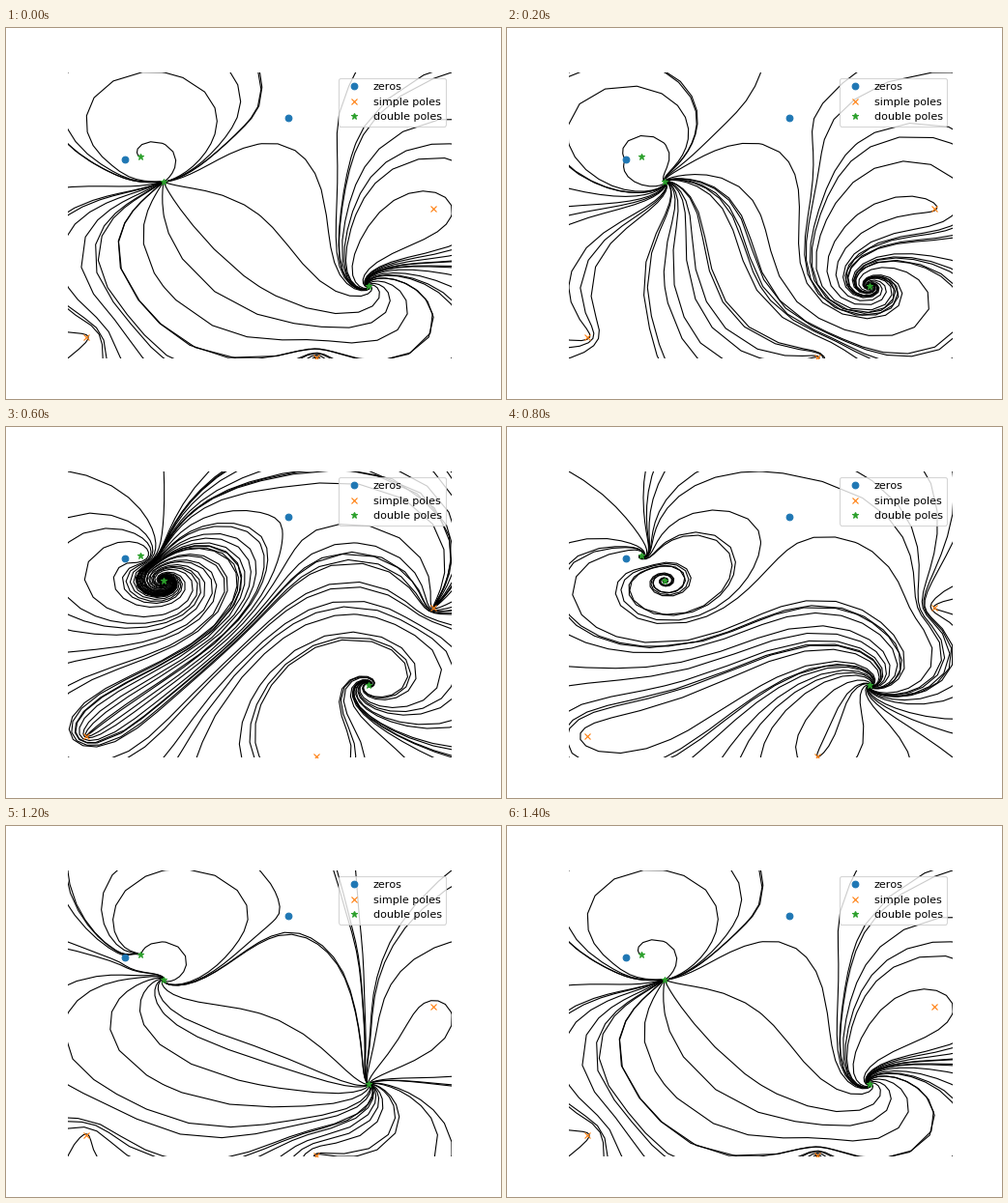
These frames come from a looping animation (512 px wide and 384 px high, 1.6 s). A matplotlib script:

```python
import math
from functools import lru_cache
import matplotlib.pyplot as plt
import numpy as np
from matplotlib.animation import FuncAnimation
from matplotlib.collections import LineCollection

ZEROS = [0.149 + 0.68j, -0.703 + 0.39j]
SIMPLE_POLES = [0.907 + 0.05j, -0.903 - 0.85j, 0.297 - 0.995j]
DOUBLE_POLES = [-0.62 + 0.41j, -0.5 + 0.235j, 0.57 - 0.497j]
FRAMES, INTERVAL = 8, 200
RTOL, ATOL = 1e-5, 1e-6
POLE_RADIUS, FAR, MAX_STEPS = 0.01, 30, 1000

# Dormand-Prince coefficients
STAGES = [
    (1 / 5,),
    (3 / 40, 9 / 40),
    (44 / 45, -56 / 15, 32 / 9),
    (19372 / 6561, -25360 / 2187, 64448 / 6561, -212 / 729),
    (9017 / 3168, -355 / 33, 46732 / 5247, 49 / 176, -5103 / 18656),
    (35 / 384, 0, 500 / 1113, 125 / 192, -2187 / 6784, 11 / 84),
]
ERROR = (-71 / 57600, 0, 71 / 16695, -71 / 1920, 17253 / 339200, -22 / 525, 1 / 40)


def velocity(z, turn, ref):
    """Natural flow 1/sqrt(q) at z, on the same side as ref."""
    q = turn
    for p in ZEROS:
        q *= z - p
    for p in SIMPLE_POLES:
        q /= z - p
    for p in DOUBLE_POLES:
        q /= (z - p) ** 2
    v = 1 / q ** 0.5
    return v if (v * ref.conjugate()).real >= 0 else -v


def scaled_norm(v, a, b):
    sx = ATOL + RTOL * max(abs(a.real), abs(b.real))
    sy = ATOL + RTOL * max(abs(a.imag), abs(b.imag))
    return math.hypot(v.real / sx, v.imag / sy) / math.sqrt(2)


def ray(z, turn, ref):
    """Follow the foliation from z with adaptive steps."""
    path = [z]
    k0 = velocity(z, turn, ref)
    h = 0.01 / abs(k0)
    for _ in range(MAX_STEPS):
        ks = [k0]
        for row in STAGES:
            end = z + h * sum(c * k for c, k in zip(row, ks))
            ks.append(velocity(end, turn, ks[-1]))
        err = scaled_norm(h * sum(c * k for c, k in zip(ERROR, ks)), z, end)
        factor = min(10, max(0.2, 0.9 * max(err, 1e-10) ** -0.2))
        h *= factor
        if err >= 1:
            continue
        z, k0 = end, ks[-1]
        path.append(z)
        if abs(z) > FAR or min(abs(z - p) for p in DOUBLE_POLES) < POLE_RADIUS:
            break
    return path


@lru_cache(maxsize=None)
def trajectories(step):
    turn = np.exp(2j * math.pi * step / (FRAMES - 1)).item()
    lines = []
    for x in np.linspace(-1, 1, 5).tolist():
        for y in np.linspace(-1, 1, 5).tolist():
            start = complex(x, y)
            back, ahead = (ray(start, turn, s) for s in (-1 + 0j, 1 + 0j))
            path = np.array(back[::-1] + ahead[1:])
            lines.append(np.column_stack([path.real, path.imag]))
    return lines


plt.rcParams["text.kerning_factor"] = 6
fig, ax = plt.subplots(figsize=(6.4, 4.8), dpi=80)
ax.axis("off")
ax.set(xlim=(-1, 1), ylim=(-1, 1))
curves = ax.add_collection(
    LineCollection([], colors="black", linewidths=1, zorder=2), autolim=False)
for points, marker, label in [(ZEROS, "o", "zeros"),
                              (SIMPLE_POLES, "x", "simple poles"),
                              (DOUBLE_POLES, "*", "double poles")]:
    ax.plot(np.real(points), np.imag(points), marker, label=label)
ax.legend(loc="upper right")


def update(frame):
    curves.set_segments(trajectories(frame % (FRAMES - 1)))
    return [curves]


anim = FuncAnimation(fig, update, frames=FRAMES, interval=INTERVAL, repeat=True)
plt.show()
```
